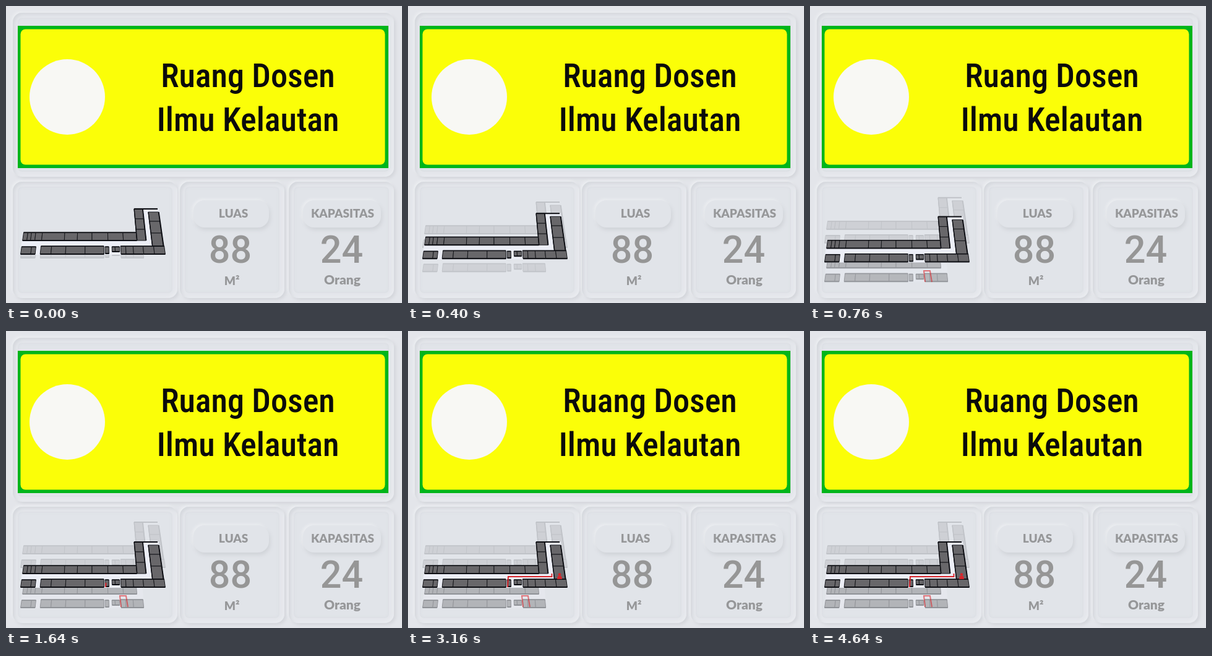
These frames come from a looping animation (640x480 px, 5.12 s). An HTML page:

```html
<!DOCTYPE html>
<html lang="id">
<head>
<meta charset="utf-8">
<style>
  html, body { margin: 0; width: 100%; height: 100%; overflow: hidden; background: #e3e5ea; }
  body { position: relative; }
  div, svg { position: absolute; box-sizing: border-box; }
  .panel {
    border-radius: 15px; background: #e1e4e9;
    box-shadow: 3px 3px 5px #d4d6db, -2px -2px 4px #edeff2, inset 3px 3px 5px #d5d8dd, inset -2px -2px 4px #eaecf0,
      inset 0 0 0 8px #e4e6eb, inset 0 0 5px 8px #d9dce1;
  }
  .pill { border-radius: 18px; background: #e1e4e9; box-shadow: 2px 4px 6px #d0d3d8, -2px -2px 4px #edeff2; }
  svg { left: 0; top: 0; width: 640px; height: 480px; }
  text { text-anchor: middle; }
  .title { font: 500 54px "Roboto Condensed", Roboto, sans-serif; font-stretch: 75%; fill: #0b0b0b; }
  .label { font: 900 19px Lato, sans-serif; fill: #969799; }
  .unit { font-size: 21px; }
  .value { font: 500 61px Roboto, sans-serif; fill: #969696; }
  .room { fill: #68676a; stroke: #17181c; stroke-width: 1; }
  .wall { fill: #0d0e13; }
  .hall { fill: #eceef6; }
  .route { fill: none; stroke: #d9262c; stroke-width: 2; stroke-dasharray: 1; }
</style>
</head>
<body>
<div class="panel" style="left:11px;top:11px;width:616px;height:265px"></div>
<div class="panel" style="left:11px;top:284px;width:266px;height:188px"></div>
<div class="panel" style="left:281px;top:284px;width:169px;height:188px"></div>
<div class="panel" style="left:457px;top:284px;width:170px;height:188px"></div>
<div class="pill" style="left:303px;top:314px;width:122px;height:44px"></div>
<div class="pill" style="left:480px;top:314px;width:126px;height:44px"></div>
<svg viewBox="0 0 640 480">
  <path fill="#00b51a" d="M19 32H618V262H19z"/>
  <rect x="23.500" y="37.500" width="589" height="219" rx="8" fill="#fbfe08"/>
  <circle cx="99" cy="147" r="61" fill="#f8f8f4"/>
  <text class="title" x="391" y="131">Ruang Dosen</text>
  <text class="title" x="391" y="202">Ilmu Kelautan</text>
  <text class="label" x="367.5" y="342">LUAS</text>
  <text class="label" x="544" y="342">KAPASITAS</text>
  <text class="value" x="362.5" y="415">88</text>
  <text class="value" x="542.5" y="415">24</text>
  <text class="label" x="365" y="451">M²</text>
  <text class="label unit" x="543.5" y="450">Orang</text>

  <g id="lower"></g>
  <path id="lowerRoute" class="route" pathLength="1" opacity=".6" d="M186 446L184 428H194L197 446"/>
  <g id="upper" opacity=".15"></g>
  <g id="middle"></g>
  <path id="route" class="route" pathLength="1" d="M161 414L162 397H232.500V392"/>
  <g id="marker" fill="#d9262c">
    <circle cx="245" cy="393.500" r="2.300"/>
    <path d="M242 396H248L249 401H241z"/>
  </g>
</svg>
<script>
  const LOOP = 5120;
  const $ = id => document.getElementById(id);
  const progress = (t, start, end) => Math.min(1, Math.max(0, (t - start) / (end - start)));

  // A rectangle on the floor plane, widening slightly towards the viewer.
  function quad(kind, x1, y1, x2, y2) {
    const at = (x, y) => `${(140 + (x - 140) * (1 + (y - 397) * .00125)).toFixed(1)},${y}`;
    return `<polygon class="${kind}" points="${at(x1, y1)} ${at(x2, y1)} ${at(x2, y2)} ${at(x1, y2)}"/>`;
  }

  // Neighbouring rooms closed by a thick wall along both long sides.
  function row(xs, y1, y2) {
    const left = xs[0], right = xs[xs.length - 1];
    return xs.slice(1).map((x, i) => quad('room', xs[i], y1, x, y2)).join('')
      + quad('wall', left, y1 - .5, right, y1 + 1) + quad('wall', left, y2 - 1, right, y2 + 1);
  }
  function column(ys, x1, x2) {
    const top = ys[0], bottom = ys[ys.length - 1];
    return ys.slice(1).map((y, i) => quad('room', x1, ys[i], x2, y)).join('')
      + quad('wall', x1 - .5, top, x1 + 1, bottom) + quad('wall', x2 - 1, top, x2 + 1, bottom);
  }

  const barHall = quad('hall', 25, 379, 222, 415);
  const wingHall = quad('hall', 212, 341, 255, 415);
  const bar = row([26, 33, 39, 46, 57, 94, 115, 139, 165, 190, 212], 379, 392)
    + row([26, 42, 49], 402, 414)
    + row([57, 74, 97, 128, 158], 401, 414)
    + row([160, 166], 402, 413) + row([171, 176, 183], 402, 410)
    + row([185, 193, 205, 221], 401, 414);
  const wing = column([341, 357, 374, 392], 212, 227)
    + column([346, 361, 380, 401], 236, 254)
    + row([221, 238, 255], 401, 414)
    + quad('wall', 212, 340, 253, 342);

  $('lower').innerHTML = barHall + bar;
  $('upper').innerHTML = $('middle').innerHTML = barHall + wingHall + bar + wing;

  function draw(t) {
    const spread = progress(t, 0, 800) ** .85;
    const shift = (id, from, to) =>
      $(id).setAttribute('transform', `translate(0 ${from + (to - from) * spread})`);
    shift('lower', -7, 33);
    shift('upper', -14, -32);
    shift('middle', -13, 0);
    $('lower').setAttribute('opacity', .14 + .24 * progress(t, 400, 800));

    const trace = (id, p) => {
      $(id).style.strokeDashoffset = 1 - p;
      $(id).style.visibility = p ? 'visible' : 'hidden';
    };
    trace('lowerRoute', progress(t, 580, 760));
    trace('route', progress(t, 1600, 2120));
    $('marker').setAttribute('opacity', progress(t, 2920, 3160));
  }

  function tick() {
    const t = performance.now() % LOOP;
    draw(t - t % 40);
    requestAnimationFrame(tick);
  }
  tick();
</script>
</body>
</html>
```
